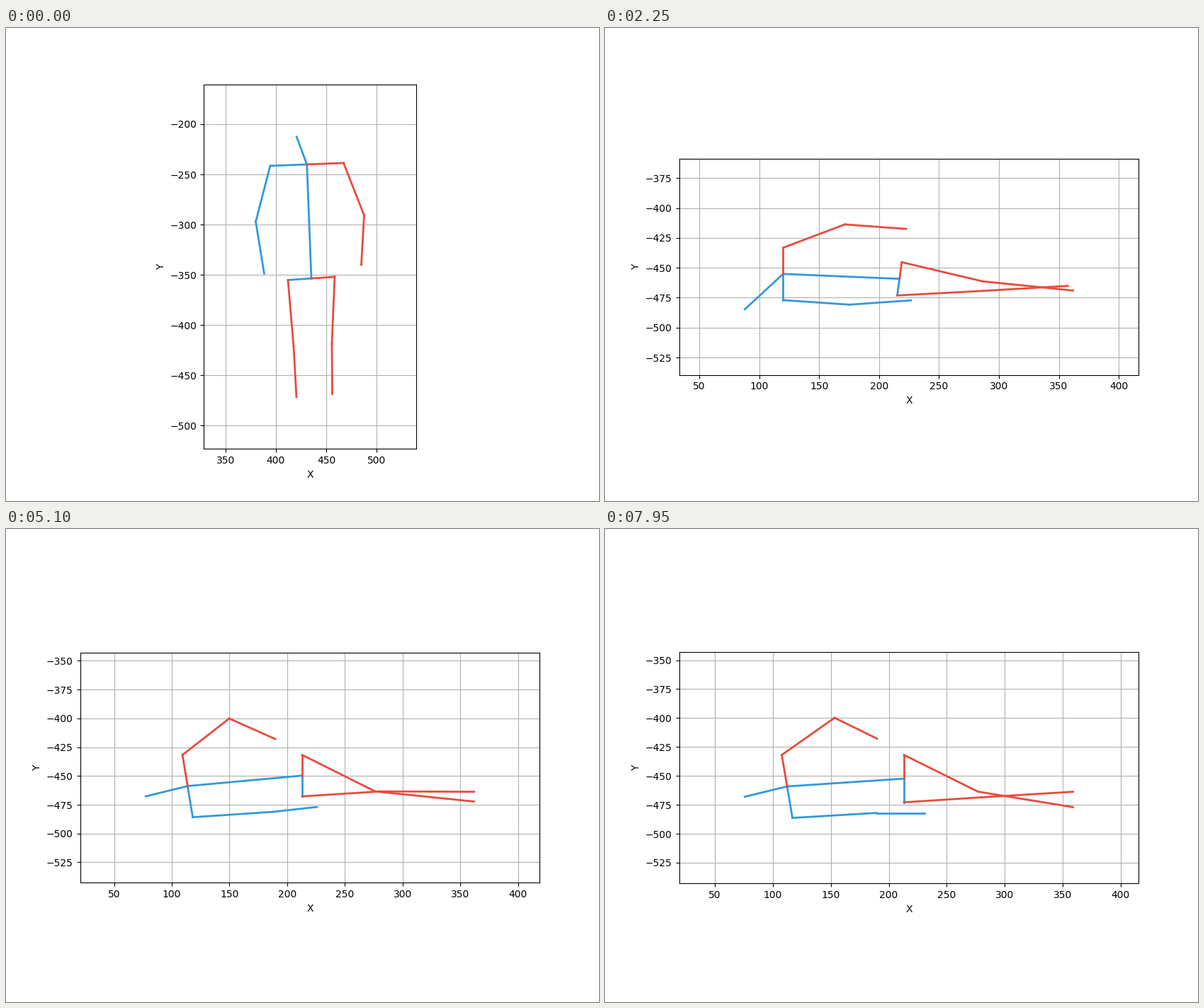
A matplotlib script that plays this animation: 837x669 px, repeating every 8000 ms.

```python
import numpy as np
import matplotlib.pyplot as plt
from matplotlib.animation import FuncAnimation

BLUE, RED = "#3498db", "#e74c3c"
STEP, FRAMES = 50, 160
JOINTS = ("head l_sho l_elb l_wri r_sho r_elb r_wri "
          "l_hip l_knee l_ank r_hip r_knee r_ank").split()
IDX = {name: i for i, name in enumerate(JOINTS)}

BONES = [
    ("head", "neck", BLUE), ("neck", "l_sho", BLUE),
    ("l_sho", "l_elb", BLUE), ("l_elb", "l_wri", BLUE),
    ("neck", "spine", BLUE), ("spine", "pelvis", BLUE),
    ("pelvis", "l_hip", BLUE),
    ("neck", "r_sho", RED), ("r_sho", "r_elb", RED), ("r_elb", "r_wri", RED),
    ("pelvis", "r_hip", RED), ("r_hip", "r_knee", RED),
    ("r_knee", "r_ank", RED),
    ("l_hip", "l_knee", RED), ("l_knee", "l_ank", RED),
]


def pose(*points):
    return np.array(points, float)


def vary(base, **changes):
    new = base.copy()
    for name, point in changes.items():
        new[IDX[name]] = point
    return new


stand = pose(
    (420.6, -212.6), (394.4, -241.5), (380, -297), (388.4, -348.6),
    (467.2, -238.7), (487.6, -290.7), (484.8, -340),
    (412, -355.1), (417.6, -420.9), (420.4, -471.4),
    (458.4, -351.9), (455.6, -418.7), (456, -468.5))
lean = pose(
    (302, -252), (292, -293), (288, -345), (308, -385),
    (344, -267), (375, -312), (380, -360),
    (368, -378), (398, -425), (430, -470),
    (402, -366), (420, -414), (450, -462))
fall = pose(
    (158.5, -484.2), (181.3, -473.2), (237.5, -439.7), (282, -467.4),
    (192.2, -445.3), (243, -434.1), (293.4, -467.4),
    (276.9, -439.7), (338.9, -417.1), (417.5, -400.3),
    (276.9, -417.1), (344.2, -422.7), (417.5, -400.3))
down = pose(
    (88, -484.7), (120, -477), (175.3, -480.8), (226.7, -477.2),
    (120, -433.2), (171.5, -413.7), (222.6, -417.5),
    (215.2, -473.1), (286.4, -469.3), (357.6, -465.1),
    (219, -445.3), (286.4, -461.3), (361.9, -469))
rest = pose(
    (77, -468.1), (118.5, -486.9), (183.3, -477.5), (205.8, -464.1),
    (109.3, -436.1), (151, -399.3), (187.5, -417.5),
    (211.2, -468.4), (279.4, -464), (358.9, -464.1),
    (211.2, -431.6), (271.5, -463.8), (358.9, -473))
reach = vary(
    rest, head=(77.5, -467.7), l_sho=(118.2, -485.8), l_elb=(187.2, -481.2),
    l_wri=(225.9, -476.9), r_sho=(109.3, -431.7), r_elb=(149.8, -400.1),
    r_wri=(189.7, -417.9), l_hip=(213, -467.7), l_knee=(280.6, -463.4),
    l_ank=(362, -463.7), r_hip=(213, -431.7), r_knee=(276.3, -463.4),
    r_ank=(362, -472.2))
settle = vary(
    reach, head=(75.8, -468.4), l_sho=(116.7, -486.7), l_elb=(186.2, -482),
    l_wri=(216.2, -477.7), r_sho=(107.8, -432.2), r_elb=(148.5, -400.4),
    r_wri=(189, -418.3), l_hip=(212.2, -468.4), l_knee=(280.4, -464.1),
    l_ank=(362, -464.4), r_hip=(212.2, -432.2), r_knee=(271.8, -459.4),
    r_ank=(362, -472.9))
final = vary(
    settle, head=(75.8, -468), l_sho=(116.9, -486.3), l_elb=(189.3, -482),
    l_wri=(230.8, -482), r_sho=(107.7, -431.9), r_elb=(153.2, -399.8),
    r_wri=(189.9, -417.8), l_hip=(213.1, -472.8), l_knee=(280, -468.5),
    l_ank=(358.9, -463.7), r_hip=(213.1, -431.9), r_knee=(276.9, -463.6),
    r_ank=(358.9, -477))


def linear(u):
    return u


def ease_in(u):
    return u ** 2


def ease_out(u):
    return 1 - (1 - u) ** 2


# (time in ms, pose, easing towards the next pose)
KEYS = [
    (0, stand, ease_in), (850, lean, linear), (1300, fall, ease_out),
    (2250, down, ease_out), (3900, rest, linear), (5100, reach, linear),
    (6000, settle, linear), (7950, final, linear),
]


def pose_at(ms):
    for (t0, a, ease), (t1, b, _) in zip(KEYS, KEYS[1:]):
        if ms <= t1:
            return a + (b - a) * ease((ms - t0) / (t1 - t0))
    return final


def skeleton(points):
    joints = dict(zip(JOINTS, points))
    joints["neck"] = (joints["l_sho"] + joints["r_sho"]) / 2
    joints["pelvis"] = (joints["l_hip"] + joints["r_hip"]) / 2
    joints["spine"] = (joints["neck"] + joints["pelvis"]) / 2
    return joints


# The small surplus keeps the pixel size from rounding down.
fig, ax = plt.subplots(figsize=(8.3701, 6.6901), dpi=100)
ax.set_aspect("equal", adjustable="box")
ax.set_xlabel("X")
ax.set_ylabel("Y")
ax.grid(True)
lines = [ax.plot([], [], color=color, lw=2)[0] for _, _, color in BONES]


def update(frame):
    points = pose_at(frame * STEP)
    joints = skeleton(points)
    for line, (a, b, _) in zip(lines, BONES):
        line.set_data(*zip(joints[a], joints[b]))
    lo, hi = points.min(axis=0), points.max(axis=0)
    pad = 0.2 * (hi - lo).max()
    ax.set_xlim(lo[0] - pad, hi[0] + pad)
    ax.set_ylim(lo[1] - pad, hi[1] + pad)
    return lines


anim = FuncAnimation(fig, update, frames=FRAMES, interval=STEP,
                     repeat=True, repeat_delay=0, blit=False)
plt.show()
```
